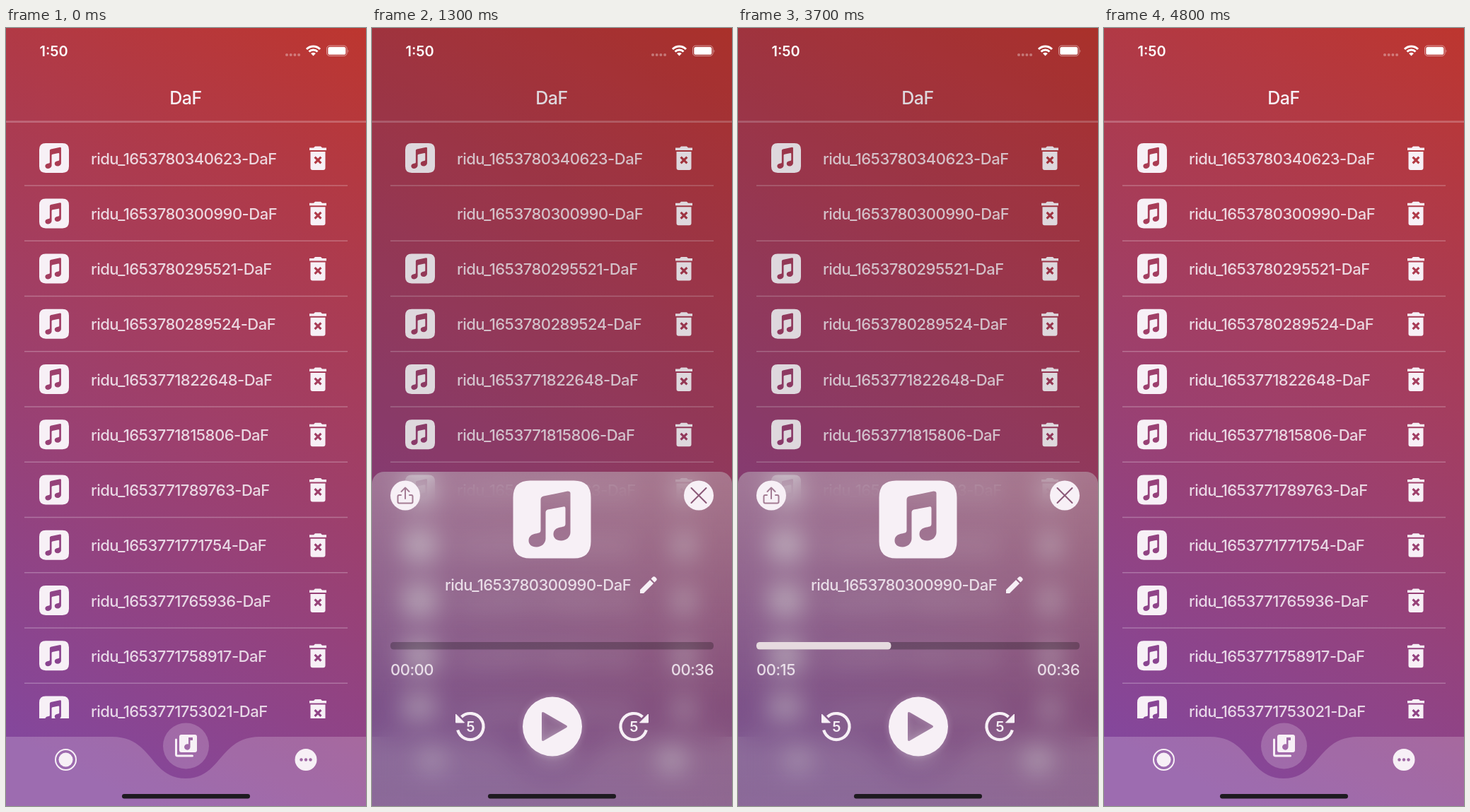
Animation of 509x1101 px, one loop 4900 ms. Source, as an HTML page:

```html
<!DOCTYPE html>
<html lang="de">
<head>
<meta charset="utf-8">
<title>Recordings</title>
<style>
  html, body { margin: 0; width: 100%; height: 100%; overflow: hidden; }
  body { position: relative; background: #a13f66; }
  svg { position: absolute; left: 0; top: 0; display: block; fill: #f7f0f6; }
  text { font: 500 22px Inter, Roboto, sans-serif; letter-spacing: -.5px; }
  .soft { fill-opacity: .86; }
  .mid { text-anchor: middle; }
  .line { fill: none; stroke-linecap: round; stroke-linejoin: round; }
  #sheet {
    position: absolute; left: 0; top: 627.5px; width: 509px; height: 474px;
    border-radius: 17px 17px 0 0; overflow: hidden;
    background: linear-gradient(rgba(198,198,202,.44), rgba(140,140,142,.26) 68%, rgba(135,135,138,.24));
    -webkit-backdrop-filter: blur(18px); backdrop-filter: blur(18px);
  }
</style>
</head>
<body>
<svg width="509" height="1101">
  <defs>
    <linearGradient id="sky" gradientUnits="userSpaceOnUse" x1="509" y1="0" x2="0" y2="1000">
      <stop stop-color="#bd362f"/><stop offset="1" stop-color="#84479c"/>
    </linearGradient>
    <clipPath id="listClip"><path d="M0 134H509V977H0z"/></clipPath>
    <clipPath id="rowClip"><path d="M26 225H483V299H26z"/></clipPath>
    <!-- 110 px tile, origin at its centre -->
    <path id="note" fill-rule="evenodd" transform="translate(-55 -55)" d="M24 0H86Q110 0 110 24V86Q110 110 86 110H24Q0 110 0 86V24Q0 0 24 0z
      M39 27Q39 23 43 22L77 15Q81 15 81 18V73C81 80 75 85 68 85 61 85 57 81 57 76 57 70 61 67 67 66 72 65 74 65 74 61V40Q74 36 71 37L49 41Q46 42 46 45V82C46 89 40 94 33 94 26 94 22 90 22 85 22 79 26 76 32 75 37 74 39 74 39 70z"/>
    <path id="trash" fill-rule="evenodd" d="M-12-14.5h6l2-2h8l2 2h6v3.5h-24z M-10.5-9h21v23q0 3-3 3h-15q-3 0-3-3z
      M0 .8l3.300-3.300 2.200 2.200-3.300 3.300 3.300 3.300-2.200 2.200-3.300-3.300-3.300 3.300-2.200-2.200 3.300-3.300-3.300-3.300 2.200-2.200z"/>
    <g id="turn" stroke="#f7f0f6" stroke-linejoin="round">
      <path fill="none" stroke-width="4.200" d="M12.500-13.600A18.500 18.500 0 1 0 17.800 5"/>
      <path d="M20.500-17.500V-5.500H8.500z"/>
    </g>
  </defs>

  <path fill="url(#sky)" d="M0 0H509V1101H0z"/>
  <text class="mid" x="254" y="107.5" style="font-size:25px">DaF</text>
  <path fill-opacity=".25" d="M0 131.3H509v2.6H0z"/>
  <g id="list" clip-path="url(#listClip)"></g>
  <circle id="ripple" cx="280" cy="262" clip-path="url(#rowClip)"/>

  <path fill="#fff" fill-opacity=".2" d="M0 1003H150C208 1003 203 1062 254 1062S301 1003 359 1003H509V1101H0z"/>
  <circle cx="84.5" cy="1035.5" r="14.5" fill="none" stroke="#f7f0f6" stroke-width="2"/>
  <circle cx="84.5" cy="1035.5" r="10"/>
  <circle cx="424" cy="1035.5" r="15.5"/>
  <g fill="#a069a4">
    <circle cx="417.5" cy="1035.5" r="2.2"/><circle cx="424" cy="1035.5" r="2.2"/><circle cx="430.5" cy="1035.5" r="2.2"/>
  </g>
  <circle cx="254.5" cy="1016" r="32.5" fill="#fff" fill-opacity=".2"/>
  <path class="line" stroke="#f7f0f6" stroke-width="3" d="M240.5 1007v21q0 2 2 2h21"/>
  <path fill-rule="evenodd" d="M245 1003q0-3 3-3h19q3 0 3 3v19q0 3-3 3h-19q-3 0-3-3z M258 1004h6v4h-3.5v9.5a4.2 4.2 0 1 1-2.5-3.9z"/>
  <path id="dim" fill="#000" d="M0 0H509V1101H0z"/>
</svg>

<div id="sheet">
  <svg width="509" height="474">
    <circle cx="47" cy="33.5" r="21"/>
    <path class="line" stroke="#a47c94" stroke-width="2" d="M41 33h-2.5q-2 0-2 2v7.5q0 2 2 2h17q2 0 2-2V35q0-2-2-2H53M47 38V22.5M41.5 28L47 22.5 52.5 28"/>
    <circle cx="462" cy="33.5" r="21"/>
    <path class="line" stroke="#8a5877" stroke-width="2" d="M451.5 23l21 21M472.5 23l-21 21"/>
    <text id="title" class="soft" x="103" y="168"></text>
    <path d="M379 167l14-14 5 5-14 14h-5zM394.5 151.5l2.7-2.7q1.5-1.3 3 0l2 2q1.3 1.5 0 3l-2.7 2.7z"/>
    <rect x="26" y="241" width="457" height="10.5" rx="4.5" fill="#000" fill-opacity=".25"/>
    <rect id="bar" x="26" y="241" height="10.5" rx="4.5" fill="#e6dadf"/>
    <text id="clock" class="soft" x="26" y="287.5"></text>
    <text class="soft" x="483" y="287.5" text-anchor="end">00:36</text>
    <path fill-rule="evenodd" style="filter:drop-shadow(0 0 5px rgba(255,245,250,.25))"
      d="M213 360.5a42 42 0 1 1 84 0a42 42 0 1 1-84 0z M240 342q0-3 3-1.5L275 359q2 1.5 0 3L243 380.5q-3 1.5-3-1.5z"/>
    <g id="back"><use href="#turn" transform="scale(-1 1)"/><text class="mid" y="7" style="font-size:20px;font-weight:600">5</text></g>
    <g id="ahead"><use href="#turn"/><text class="mid" y="7" style="font-size:20px;font-weight:600">5</text></g>
  </svg>
</div>

<svg width="509" height="1101">
  <use id="flyer" href="#note"/>
  <g fill="#fff">
    <text x="47.5" y="39.5" style="font-size:20px;font-weight:600;letter-spacing:0">1:50</text>
    <g fill-opacity=".35">
      <circle cx="397" cy="38" r="2"/><circle cx="402.7" cy="38" r="2"/><circle cx="408.4" cy="38" r="2"/><circle cx="414.1" cy="38" r="2"/>
      <path d="M483.2 30.5q2.5 2 0 4.5z"/>
    </g>
    <g transform="translate(434.5 39.5)">
      <path fill="none" stroke="#fff" stroke-width="3" d="M-9.5-9.5A13.4 13.4 0 0 1 9.5-9.5M-6-6A8.5 8.5 0 0 1 6-6"/>
      <path d="M0 0L-3.4-3.4A4.8 4.8 0 0 1 3.4-3.4z"/>
    </g>
    <rect x="453.5" y="25" width="28.5" height="14.5" rx="4.2" fill="none" stroke="#fff" stroke-opacity=".5"/>
    <rect x="455.3" y="26.8" width="25" height="11" rx="2.6"/>
  </g>
  <rect x="164" y="1084" width="181" height="6.5" rx="3.2" fill="#1e1a20"/>
</svg>

<script>
  const LOOP = 4900, STEP = 100, ROW = 78.25, LENGTH = 36;
  const $ = id => document.getElementById(id);
  const name = id => `ridu_1653${id}-DaF`;
  const ids = ['780340623', '780300990', '780295521', '780289524', '771822648', '771815806',
    '771789763', '771771754', '771765936', '771758917', '771753021'];

  // The second row's tile is the flyer, which moves between list and sheet.
  $('list').innerHTML = ids.map((id, i) => `<g transform="translate(0 ${184 + i * ROW})">
    ${i === 1 ? '' : '<use href="#note" transform="translate(68 0) scale(.382)"/>'}
    <text class="soft" x="120" y="8.5">${name(id)}</text>
    <use href="#trash" x="441"/>
    <path fill-opacity=".28" d="M26 38.3H483v1.5H26z"/></g>`).join('');
  $('title').textContent = name(ids[1]);

  // Values at the steps of opening (from 900 ms) and closing (from 4400 ms).
  const track = (open, close) => t => {
    const [keys, start] = t < 4400 ? [open, 900] : [close, 4400];
    const p = Math.min(Math.max((t - start) / STEP, 0), keys.length - 1);
    const i = Math.floor(p), next = keys[Math.min(i + 1, keys.length - 1)];
    return keys[i] + (next - keys[i]) * (p - i);
  };
  const drop = track([473.5, 404, 150, 28, 0], [0, 24, 146, 375, 473.5]);
  const flyX = track([0, .566, .92, .99, 1], [1, .5, .083, .01, 0]);
  const flyY = track([0, .69, .93, .99, 1], [1, .72, .314, .06, 0]);
  const grow = track([0, .25, .75, .96, 1], [1, .45, .08, .01, 0]);
  const shade = track([0, .045, .08, .095, .1], [.1, .1, .09, .04, 0]);
  const rippleR = track([80, 152, 230, 260, 260], [0]);
  const rippleAlpha = track([0, .1, .06, .02, 0], [0]);

  const taps = [[2300, 5], [2800, 5], [3300, 5], [3900, -5]];
  const swing = (t, start) => t < start || t >= start + 400 ? 0
    : 90 * Math.sin(Math.PI * (t - start + 50) / 450);

  function draw(t) {
    let seconds = 0, ahead = 0, back = 0;
    for (const [start, jump] of taps) {
      if (t >= start) seconds += jump;
      if (jump > 0) ahead += swing(t, start);
      else back -= swing(t, start);
    }
    const y = drop(t);
    $('sheet').style.transform = `translateY(${y}px)`;
    $('sheet').style.visibility = y < 473 ? 'visible' : 'hidden';
    $('dim').setAttribute('fill-opacity', shade(t));
    $('ripple').setAttribute('r', rippleR(t));
    $('ripple').setAttribute('fill-opacity', rippleAlpha(t));
    $('flyer').setAttribute('transform',
      `translate(${68 + 186.5 * flyX(t)} ${262.5 + 433 * flyY(t)}) scale(${(42 + 68 * grow(t)) / 110})`);
    $('bar').setAttribute('width', 457 * seconds / LENGTH);
    $('clock').textContent = '00:' + String(seconds).padStart(2, '0');
    $('ahead').setAttribute('transform', `translate(370 360.5) rotate(${ahead})`);
    $('back').setAttribute('transform', `translate(139 360.5) rotate(${back})`);
  }

  const begin = performance.now();
  function tick() {
    const t = (performance.now() - begin) % LOOP;
    draw(Math.floor(t / STEP) * STEP);
    requestAnimationFrame(tick);
  }
  tick();
</script>
</body>
</html>
```
